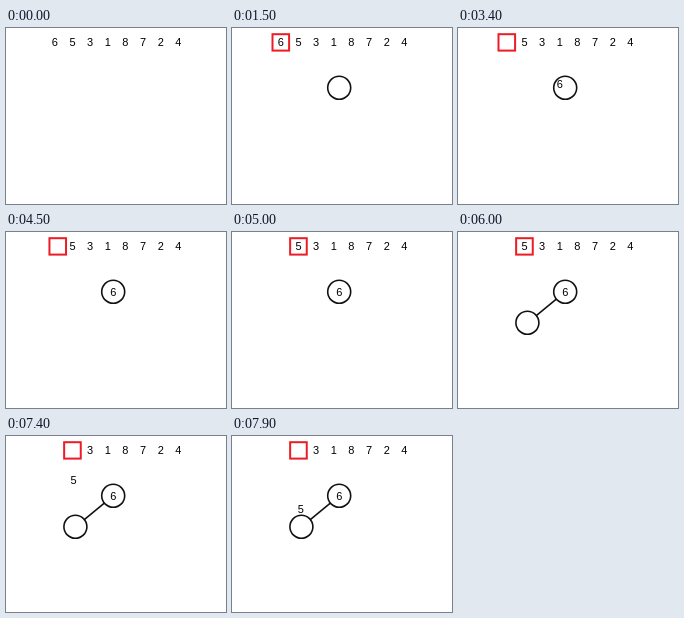
An HTML page with a canvas that plays this animation: 220 px wide and 176 px high, repeating every 8000 ms.

```html
<!DOCTYPE html>
<html lang="en">
<head>
<meta charset="utf-8">
<title>Building a heap</title>
<style>
  html, body { margin: 0; width: 100%; height: 100%; overflow: hidden; background: #fff; }
  canvas { display: block; width: 220px; height: 176px; }
</style>
</head>
<body>
<canvas id="stage"></canvas>
<script>
const LOOP = 8000, STEP = 100;
const digits = [6, 5, 3, 1, 8, 7, 2, 4];
const root = { x: 107.2, y: 59.8 }, child = { x: 69.4, y: 90.8 };
const slot = i => ({ x: 48.8 + 17.65 * i, y: 14.4 });

const canvas = document.getElementById('stage');
const ctx = canvas.getContext('2d');
const ratio = window.devicePixelRatio || 1;
canvas.width = 220 * ratio;
canvas.height = 176 * ratio;
ctx.scale(ratio, ratio);

// Progress from 0 to 1 in whole steps; the first step shows at the start time.
function stepped(t, start, steps) {
  const done = Math.floor((t - start) / STEP) + 1;
  return Math.max(0, Math.min(1, done / steps));
}

function between(a, b, p) {
  return { x: a.x + (b.x - a.x) * p, y: a.y + (b.y - a.y) * p };
}

function node(c) {
  ctx.beginPath();
  ctx.arc(c.x, c.y, 11.5, 0, 2 * Math.PI);
  ctx.stroke();
}

function edge(a, b) {
  const r = 11.5 / Math.hypot(b.x - a.x, b.y - a.y);
  const from = between(a, b, r), to = between(b, a, r);
  ctx.beginPath();
  ctx.moveTo(from.x, from.y);
  ctx.lineTo(to.x, to.y);
  ctx.stroke();
}

function marker(c) {
  ctx.strokeStyle = '#ed1c24';
  ctx.lineWidth = 2;
  ctx.strokeRect(c.x - 8.3, c.y - 8.2, 16.6, 16.4);
}

function draw(t) {
  ctx.fillStyle = '#fff';
  ctx.fillRect(0, 0, 220, 176);

  ctx.strokeStyle = '#111';
  ctx.lineWidth = 1.6;
  if (t >= 1500) node(root);
  if (t >= 6000) {
    edge(root, child);
    node(child);
  }

  if (t >= 500) marker(between(slot(0), slot(1), stepped(t, 4500, 6)));

  const places = digits.map((_, i) => slot(i));
  places[0] = between(slot(0), root, stepped(t, 2500, 11));
  places[1] = between(slot(1), child, stepped(t, 7000, 13));

  ctx.fillStyle = '#000';
  ctx.font = '11px "Liberation Sans", Arial, sans-serif';
  ctx.textAlign = 'center';
  digits.forEach((d, i) => ctx.fillText(d, places[i].x, places[i].y + 4));
}

const begin = performance.now();
function frame() {
  draw((performance.now() - begin) % LOOP);
  requestAnimationFrame(frame);
}
frame();
</script>
</body>
</html>
```
